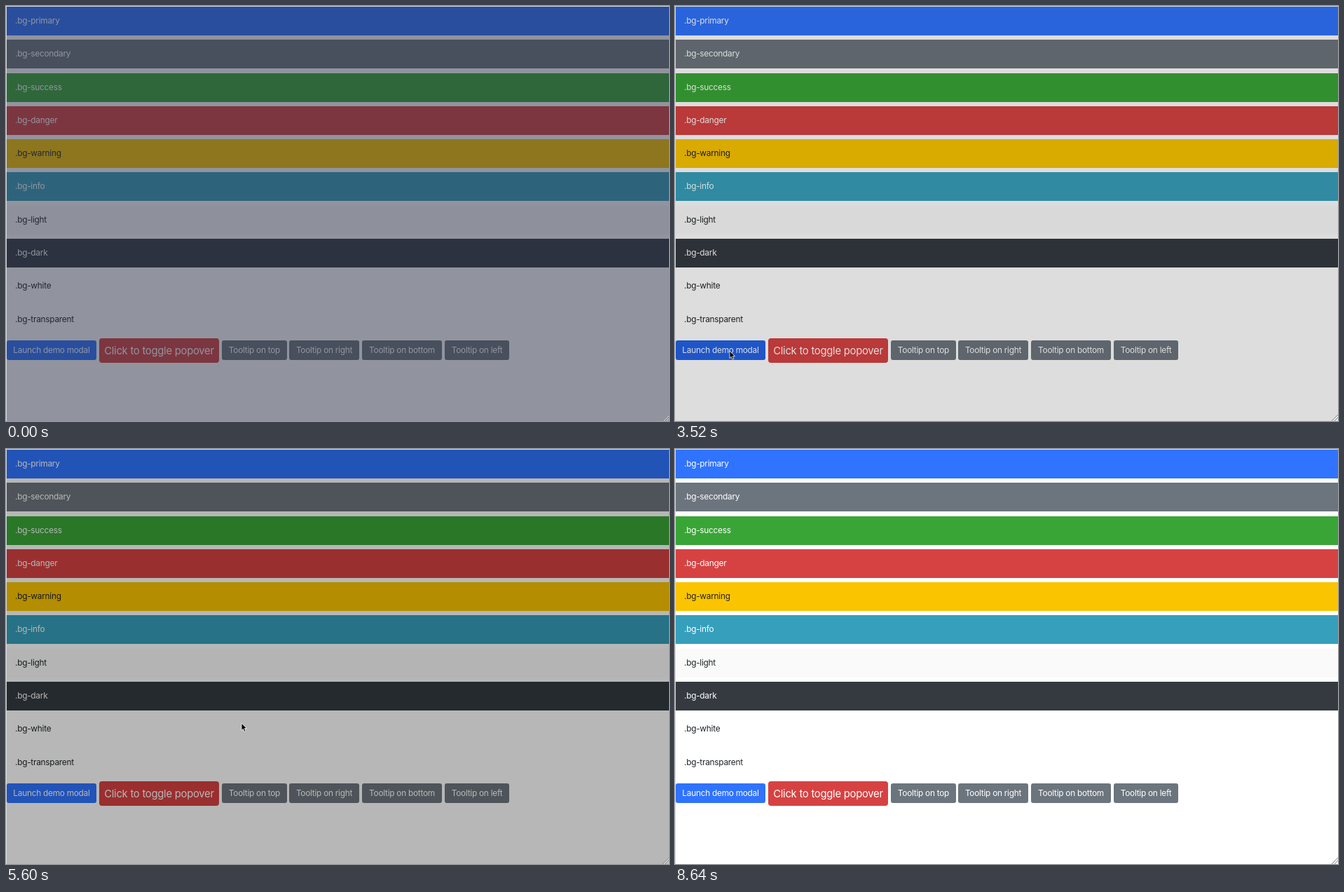
Recreate the animation shown at these times as an HTML page. Size 946 by 592 pixels, loop 9280 ms.

```html
<!DOCTYPE html>
<html lang="en">
<head>
<meta charset="utf-8">
<title>Components demo</title>
<style>
html, body { margin: 0; width: 100%; height: 100%; overflow: hidden; background: #fff; }
#stage {
  position: relative; width: 946px; height: 592px; overflow: hidden; background: #fff;
  font: 11.84px/1.5 Inter, Roboto, sans-serif; letter-spacing: -.021em; color: #212529;
}
#stage div, #stage svg { position: absolute; box-sizing: border-box; white-space: nowrap; }
.row { left: 1px; width: 945px; height: 41px; padding-left: 12px; line-height: 41px; }
.btn { border-radius: 3px; color: #fff; text-align: center; height: 28px; line-height: 28px; background: #6c757d; }
.btn.primary { background: #2f73ff; }
.btn.primary.hover { background: #2869f1; }
.btn.primary.active { background: #2462e6; }
.btn.danger { background: #d64242; height: 35px; line-height: 36px; font-size: 14.8px; border-radius: 4px; }
.btn.danger.hover { background: #c73636; }
.btn.plain.hover { background: #586067; }
#backdrop { left: 1px; top: 1px; right: 0; bottom: 0; }
#modal { left: 290px; top: 22px; width: 367px; height: 141px; background: #fff; border-radius: 4px; }
#modal .line { left: 0; width: 367px; height: 1px; background: #e5e7ea; }
#modal .title { left: 11px; top: 13px; font-size: 14.8px; font-weight: 500; }
#modal .x { left: 343px; top: 8px; font-size: 17.8px; font-weight: 700; color: #7f7f7f; }
.tip {
  height: 21px; padding: 0 6px; border-radius: 3px; background: #1a1a1a; color: #fff;
  font-size: 10.36px; line-height: 21px; text-align: center;
}
.tip::after { content: ""; position: absolute; border: 4.7px solid transparent; }
.tip.top::after { left: 50%; top: 100%; margin-left: -4.7px; border-top-color: #1a1a1a; }
.tip.bottom::after { left: 50%; bottom: 100%; margin-left: -4.7px; border-bottom-color: #1a1a1a; }
.tip.right::after { right: 100%; top: 6px; border-right-color: #1a1a1a; }
.tip.left::after { left: 100%; top: 6px; border-left-color: #1a1a1a; }
#edge { inset: 0; border: solid #d9dcdf; border-width: 1px 0 0 1px; }
#grip { left: 934px; top: 580px; }
#cursor { left: 0; top: 0; overflow: visible; }
</style>
</head>
<body>
<div id="stage">
  <div id="page"></div>
  <div id="backdrop"></div>
  <div id="modal">
    <div class="title">Modal title</div>
    <div class="x">×</div>
    <div class="line" style="top:46px"></div>
    <div style="left:11px;top:59px">...</div>
    <div class="line" style="top:88px"></div>
    <div class="btn" style="left:206px;top:101px;width:50px">Close</div>
    <div class="btn primary" style="left:262px;top:101px;width:93px">Save changes</div>
  </div>
  <div id="tips"></div>
  <div id="edge"></div>
  <svg id="grip" width="12" height="12" fill="none">
    <path d="M3 12L12 3M7 12L12 7" stroke="#858585"/>
    <path d="M4 12.4L12.4 4M8 12.4L12.4 8" stroke="#fff" stroke-width=".7"/>
  </svg>
  <svg id="cursor" width="12" height="16">
    <path id="arrow" d="M0 0V10.5L2.4 8.3L4.2 12.2L6 11.4L4.3 7.6H7.5Z" fill="#000" stroke="#fff" stroke-width=".8"/>
    <path id="hand" d="M-1 6.5V1Q-1 -.2 0 -.2Q1 -.2 1 1V4.4Q2.4 3.6 3 4.8Q4.3 4.2 4.8 5.4Q6 5 6 6.4V9L4.8 12.5H-.6L-3.2 8.4Q-3.6 6.8 -2.2 6.8L-1 8Z" fill="#fff" stroke="#111" stroke-width=".9"/>
  </svg>
</div>
<script>
const TICK = 160, TICKS = 58;
const $ = id => document.getElementById(id);

function add(parent, cls, text, style) {
  const el = document.createElement('div');
  el.className = cls;
  el.textContent = text;
  Object.assign(el.style, style);
  parent.append(el);
  return el;
}

const rows = [
  ['primary', '#2f73ff'], ['secondary', '#6c757d'], ['success', '#3aa537'],
  ['danger', '#d64242'], ['warning', '#fac400'], ['info', '#369fbb'],
  ['light', '#f9faf9'], ['dark', '#343a40'], ['white', '#fff'], ['transparent', 'transparent']
];
const darkText = ['warning', 'light', 'white', 'transparent'];
rows.forEach(([name, background], i) => add($('page'), 'row', '.bg-' + name, {
  top: 1 + 47.28 * i + 'px', background, color: darkText.includes(name) ? '#212529' : '#fff'
}));

// label, class, left, top, width
const buttons = [
  ['Launch demo modal', 'primary', 1, 477, 128],
  ['Click to toggle popover', 'danger', 133, 474, 171],
  ['Tooltip on top', 'plain', 308, 477, 93],
  ['Tooltip on right', 'plain', 404, 477, 100],
  ['Tooltip on bottom', 'plain', 508, 477, 114],
  ['Tooltip on left', 'plain', 626, 477, 92]
].map(([text, cls, x, y, w]) => add($('page'), 'btn ' + cls, text,
  { left: x + 'px', top: y + 'px', width: w + 'px' }));

// side, left, top, width, first tick, last tick
const tips = [
  ['top', 315, 451, 78, 45, 47],
  ['right', 509, 481, 85, 49, 50],
  ['bottom', 517, 510, 96, 51, 52],
  ['left', 544, 481, 77, 53, 53]
].map(([side, x, y, w, from, to]) => ({
  from, to,
  el: add($('tips'), 'tip ' + side, 'Tooltip on ' + side, { left: x + 'px', top: y + 'px', width: w + 'px' })
}));

// Each entry holds from its tick until the next one.
const at = (track, n) => track.filter(k => k[0] <= n).pop();

// tick, tint, opacity
const cool = '36,43,62', black = '0,0,0';
const shade = [
  [0, cool, .5], [15, cool, .4], [16, cool, .2], [17, black, 0],
  [22, black, .133], [23, black, .5], [35, black, .283], [36, black, 0]
];

// tick, opacity, offset
const dialog = [
  [0, 0, -37], [1, .35, -22], [2, .8, -7], [3, 1, 0],
  [11, .6, -8], [12, .2, -24], [13, 0, -37],
  [23, .4, -20], [24, 1, -3], [25, 1, 0], [33, .5, -12], [34, 0, -37]
];

// tick, x, y, shape, hovered button
const pointer = [
  [0, 0, 0, ''], [17, 96, 455, 'arrow'], [18, 78, 491, 'hand', 0],
  [22, 78, 492, 'arrow', 0], [23, 82, 488, 'arrow'], [24, 140, 448, 'arrow'],
  [25, 230, 410, 'arrow'], [26, 272, 397, 'arrow'], [30, 294, 392, 'arrow'],
  [31, 314, 391, 'arrow'], [32, 336, 391, 'arrow'], [37, 312, 440, 'arrow'],
  [38, 284, 490, 'hand', 1], [40, 292, 493, 'hand', 1], [41, 316, 511, 'arrow'],
  [44, 332, 495, 'hand', 2], [46, 341, 491, 'hand', 2], [47, 372, 491, 'hand', 2],
  [48, 430, 491, 'hand', 3], [49, 460, 492, 'hand', 3], [51, 556, 493, 'hand', 4],
  [52, 588, 493, 'hand', 4], [53, 664, 494, 'hand', 5], [54, 0, 0, '']
];

function draw(now) {
  const n = Math.floor(now / TICK) % TICKS;

  const [, tint, dim] = at(shade, n);
  $('backdrop').style.background = `rgba(${tint},${dim})`;

  const [, alpha, dy] = at(dialog, n);
  $('modal').style.opacity = alpha;
  $('modal').style.transform = `translateY(${dy}px)`;

  const [, x, y, shape, over] = at(pointer, n);
  $('cursor').style.transform = `translate(${x}px,${y}px)`;
  for (const id of ['arrow', 'hand']) $(id).style.display = id === shape ? '' : 'none';

  buttons.forEach((b, i) => {
    b.classList.toggle('hover', i === over);
    b.classList.toggle('active', i === over && (n === 21 || n === 22));
  });
  for (const { el, from, to } of tips) {
    el.style.opacity = n < from || n > to ? 0 : n === from && from === 45 ? .5 : 1;
  }
}

let start;
function loop(now) {
  start ??= now;
  draw(now - start);
  requestAnimationFrame(loop);
}
draw(0);
requestAnimationFrame(loop);
</script>
</body>
</html>
```
